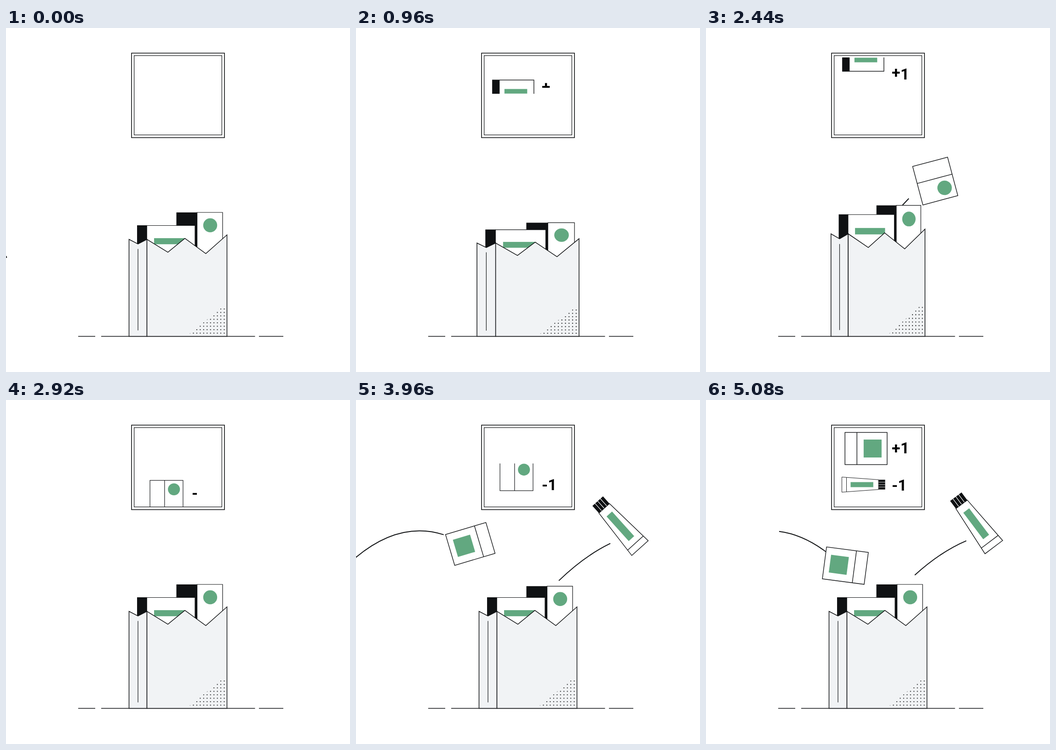
Animation, 748 px wide and 748 px high, one loop 6000 ms. Source, as an HTML page:

```html
<!DOCTYPE html>
<html lang="en">
<head>
<meta charset="utf-8">
<title>Bag stock counter</title>
<style>
  html, body { margin: 0; width: 100%; height: 100%; overflow: hidden; background: #fff; }
  svg { display: block; width: 100vw; height: 100vh; }
  .line { fill: none; stroke: #111315; stroke-width: 1.4; }
  .card { fill: #fff; stroke: #111315; stroke-width: 1.4; }
  .paper { fill: #f1f3f5; stroke: #111315; stroke-width: 1.5; }
  .ink { fill: #0f1113; }
  .green { fill: #62a880; }
  .trail { fill: none; stroke: #0f1113; stroke-width: 2; }
  #bag * { vector-effect: non-scaling-stroke; }
  text { font: 700 33.5px Roboto, Inter, sans-serif; fill: #000; }
</style>
</head>
<body>
<svg viewBox="0 0 748 748">
  <defs>
    <g id="strip">
      <rect class="card" x="-45" y="-24.5" width="90" height="49"/>
      <rect class="ink" x="-45" y="-24.5" width="15.5" height="49"/>
      <rect class="green" x="-19" y="-5" width="49.5" height="10"/>
    </g>
    <g id="jar">
      <rect class="card" x="-39.3" y="-43.3" width="78.6" height="86.6"/>
      <path class="line" d="M-39.3-5H39.3"/>
      <circle class="green" cx="15.9" cy="19.5" r="15.7"/>
    </g>
    <g id="block">
      <rect class="card" x="-45.8" y="-35" width="91.6" height="70"/>
      <path class="line" d="M19.8-35V35"/>
      <rect class="green" x="-33.8" y="-19.5" width="39" height="39"/>
    </g>
    <g id="tube">
      <path class="card" d="M-15.5-47.7H15.5L24 68.7H-24Z"/>
      <path class="line" d="M-22.9 54H22.9"/>
      <rect class="green" x="-8" y="-31" width="16" height="72"/>
      <rect class="ink" x="-15.5" y="-68.7" width="31" height="21"/>
      <path d="M-7.7-69V-48M0-69V-48M7.7-69V-48" stroke="#fff" stroke-width="1.2"/>
    </g>
    <clipPath id="itemTop"><rect x="280" y="64" width="188" height="79"/></clipPath>
    <clipPath id="itemLow"><rect x="280" y="138" width="188" height="94.5"/></clipPath>
    <clipPath id="textTop"><rect x="398" y="78" width="60" height="52"/></clipPath>
    <clipPath id="textLow"><rect x="398" y="159" width="60" height="52"/></clipPath>
    <clipPath id="corner"><path d="M399 665L468 609H479V667H399Z"/></clipPath>
  </defs>

  <rect class="line" x="273" y="54.6" width="202" height="183.8" style="stroke-width:1.6"/>
  <g id="rows"></g>
  <rect class="line" x="278.6" y="60" width="190.8" height="172.5" style="stroke-width:1.2"/>
  <path class="line" d="M157 670.5H194M207 670.5H541.5M550 670.5H603"/>

  <g id="flights"></g>

  <g id="bag">
    <g id="carton">
      <rect class="ink" x="370.5" y="401" width="45" height="199"/>
      <rect class="card" x="415.5" y="401" width="55.5" height="199" style="stroke-width:1.2"/>
      <circle class="green" cx="444" cy="429" r="15.2"/>
    </g>
    <g id="packet">
      <rect class="card" x="306" y="429.5" width="105" height="170" style="stroke-width:1.2"/>
      <rect class="ink" x="285" y="429" width="21.5" height="171"/>
      <rect class="green" x="322" y="457" width="68" height="13.2"/>
    </g>
    <path class="paper" d="M267.5 670.5V459.5L287 469.7L306.5 459.5V670.5Z"/>
    <path class="paper" d="M306.5 670.5V459.5L352 487.7L389 457.5L434.5 490.5L480.5 449.8V670.5Z"/>
    <path class="line" d="M287 480.5V657.5" style="stroke-width:1.2"/>
    <g id="dots" class="ink" clip-path="url(#corner)"></g>
  </g>
</svg>
<script>
const LOOP = 6000;
const $ = id => document.getElementById(id);
const make = (name, parent, attrs, text = '') => {
  const el = document.createElementNS('http://www.w3.org/2000/svg', name);
  for (const key in attrs) el.setAttribute(key, attrs[key]);
  el.textContent = text;
  parent.append(el);
  return el;
};

const clamp = u => Math.min(1, Math.max(0, u));
const mix = (a, b, u) => a + (b - a) * u;
const smooth = u => u * u * (3 - 2 * u);
const inOut = u => u < .5 ? 4 * u ** 3 : 1 - 4 * (1 - u) ** 3;
const easeOut = (u, n) => 1 - (1 - clamp(u)) ** n;

function keyed(t, keys) {
  if (t <= keys[0][0]) return keys[0][1];
  for (let i = 1; i < keys.length; i++) {
    const [t0, v0] = keys[i - 1], [t1, v1] = keys[i];
    if (t < t1) return mix(v0, v1, smooth((t - t0) / (t1 - t0)));
  }
  return keys.at(-1)[1];
}

for (let row = 0; row < 8; row++)
  for (let col = 0; col < 11; col++)
    make('circle', $('dots'), { cx: 474.5 - 7.45 * col, cy: 663.5 - 7.5 * row, r: 1.1 });

// Counter rows: start times are for item, sign and digit.
const SLIDE = 480, TEXT_TRAVEL = 42;
const rows = [
  { item: 'strip', at: [341.8, 103], turn: 0, scale: 1, sign: '+', travel: 66,
    enter: [725, 730, 860], leave: [2200, 2268, 2310] },
  { item: 'jar', at: [349, 184], turn: -90, scale: .83, sign: '-', travel: 82,
    enter: [2640, 2668, 2820], leave: [3774, 3890, 3930] },
  { item: 'block', at: [348, 105.5], turn: 180, scale: 1, sign: '+', travel: 74,
    enter: [4180, 4230, 4360] },
  { item: 'tube', at: [342.5, 184], turn: 90, scale: .685, sign: '-', travel: 66,
    enter: [4510, 4550, 4600] }
];

for (const row of rows) {
  const plus = row.sign === '+', place = plus ? 'Top' : 'Low', y = plus ? 115.5 : 196.5;
  const itemBox = make('g', $('rows'), { 'clip-path': `url(#item${place})` });
  const textBox = make('g', $('rows'), { 'clip-path': `url(#text${place})` });
  const item = make('g', itemBox, {});
  make('use', item, {
    href: '#' + row.item,
    transform: `translate(${row.at}) rotate(${row.turn}) scale(${row.scale})`
  });
  row.parts = [
    item,
    make('text', textBox, { x: 404, y }, row.sign),
    make('text', textBox, { x: plus ? 422.8 : 417.3, y }, '1')
  ];
}

function drawRow(row, t) {
  row.parts.forEach((part, i) => {
    const from = row.enter[i], to = row.leave ? row.leave[i] : Infinity;
    const shown = t > from && t < to + SLIDE;
    part.style.display = shown ? '' : 'none';
    if (!shown) return;
    const travel = i ? TEXT_TRAVEL : row.travel;
    const rise = inOut(clamp((t - from) / SLIDE)) + inOut(clamp((t - to) / SLIDE));
    part.setAttribute('transform', `translate(0 ${travel * (1 - rise)})`);
  });
}

// Flight paths are parabolas; x and y are the peak.
const inward = { x: 138, y: 284.5, k: .00302 };
const outward = { x: 610, y: 284.5, k: .00302 };
const flat = { x: 665, y: 285, k: .00215 };
const height = (p, x) => p.y + p.k * (x - p.x) ** 2;

function arc(p, a, b) {
  const mid = (a + b) / 2;
  const ctrl = height(p, a) + p.k * (a - p.x) * (b - a);
  return `M${a} ${height(p, a)}Q${mid} ${ctrl} ${b} ${height(p, b)}`;
}

// Pose relative to the leading end of the trail.
function fallPose(head) {
  const d = head - 190, on = Math.max(0, d) / 71;
  return [58 - 16 * on, 20 + 10 * on, -16.8 + (d > 0 ? 24.3 * on : .05 * d)];
}

const flights = [
  { item: 'strip', path: inward, from: 0, to: 720, scale: 1.2, flip: 180,
    head: t => mix(-118, 400, clamp((t - 20) / 630)),
    tail: t => mix(-330, 400, t / 720),
    pose: fallPose },
  { item: 'jar', path: outward, from: 2293, to: 2900,
    head: t => 440 + .95 * (t - 2440),
    pose: (head) => [57.5, -38, -15 + .05 * (head - 440)] },
  { item: 'block', path: inward, from: 3560, to: LOOP,
    head: t => mix(-118, 261, easeOut((t - 3560) / 880, 2.77)),
    tail: t => mix(-600, 159, easeOut((t - 3560) / 880, 2)),
    pose: fallPose },
  { item: 'tube', path: flat, from: 3602, to: LOOP,
    head: t => 566 - 62 * (Math.max(0, 4440 - t) / 640) ** 5.4,
    pose: (head) => [18.5, -41, head > 553 ? -42 + .385 * (head - 553) : -42 + .15 * (head - 553)] }
];

for (const f of flights) {
  f.group = make('g', $('flights'), {});
  f.trail = make('path', f.group, { class: 'trail' });
  f.body = make('use', f.group, { href: '#' + f.item });
}

function drawFlight(f, t) {
  const shown = t > f.from && t < f.to;
  f.group.style.display = shown ? '' : 'none';
  if (!shown) return;
  const head = f.head(t), tail = f.tail ? f.tail(t) : head - 112;
  const [dx, dy, turn] = f.pose(head);
  f.trail.setAttribute('d', arc(f.path, Math.min(tail, head), head));
  f.body.setAttribute('transform',
    `translate(${head + dx} ${height(f.path, head) + dy}) ` +
    `rotate(${turn + (f.flip || 0)}) scale(${f.scale || 1})`);
}

const squash = [
  [590, 0], [740, .1], [1140, 0],
  [1920, 0], [2180, .1], [2420, -.04], [2460, -.04], [2640, 0],
  [3220, 0], [3480, .1], [3720, -.04], [3940, 0]
];
const cartonDrop = [
  [640, 0], [900, 14], [1340, -12], [1540, 0],
  [3780, 0], [3950, 3.8], [4200, 0]
];
const packetDrop = [[2260, 0], [2440, -9.5], [2660, 0]];

function drawBag(t) {
  const k = keyed(t, squash);
  const sy = 1 - k * (k > 0 ? .9 : 1.42);
  $('bag').setAttribute('transform',
    `translate(374 670.5) scale(${1 + k} ${sy}) translate(-374 -670.5)`);
  $('carton').setAttribute('transform', `translate(0 ${keyed(t, cartonDrop)})`);
  $('packet').setAttribute('transform', `translate(0 ${keyed(t, packetDrop)})`);
}

const start = performance.now();
function draw() {
  const t = (performance.now() - start) % LOOP;
  rows.forEach(row => drawRow(row, t));
  flights.forEach(f => drawFlight(f, t));
  drawBag(t);
  requestAnimationFrame(draw);
}
draw();
</script>
</body>
</html>
```
